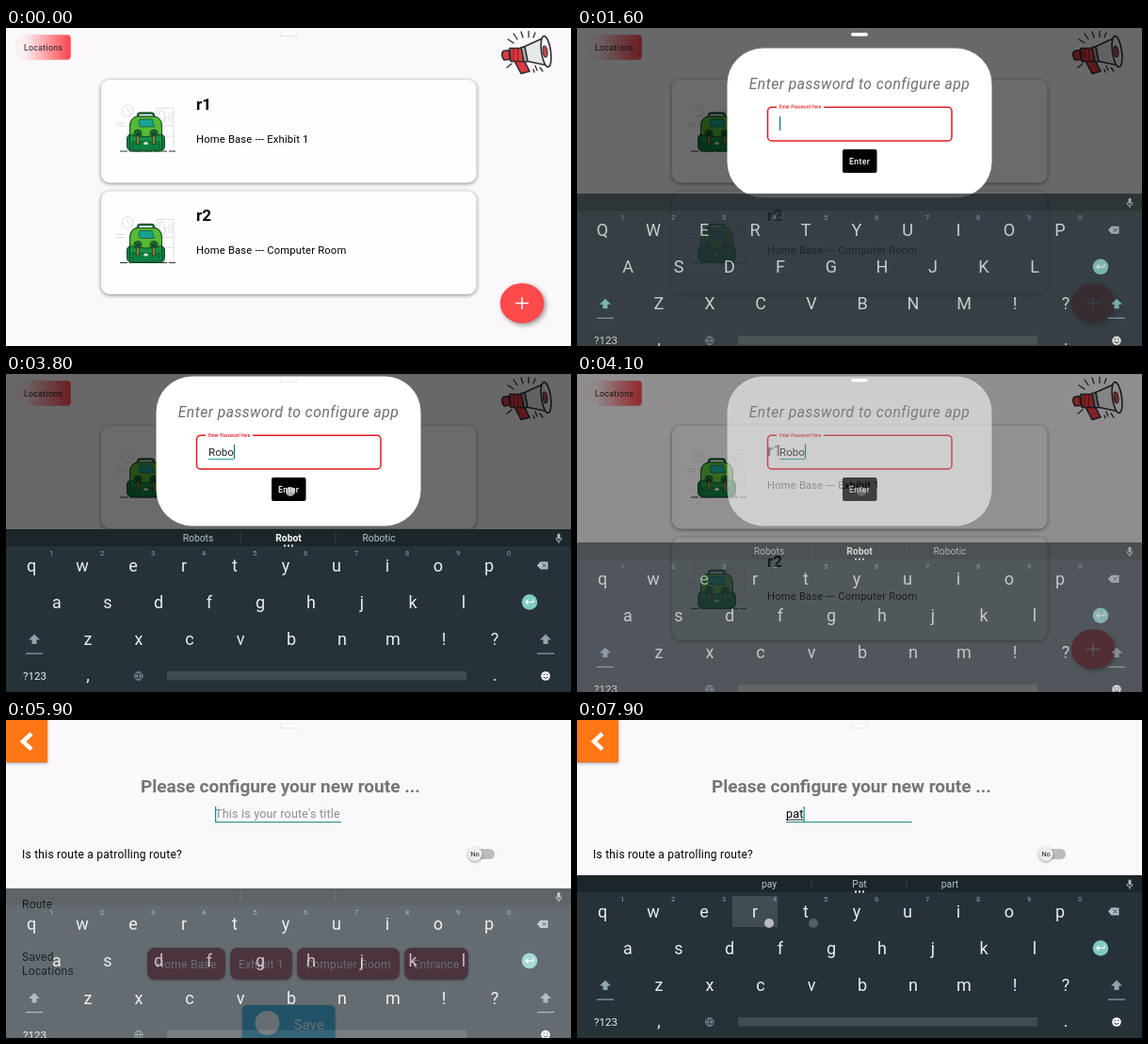
Recreate the animation shown at these times as an HTML page. Size 600x338 px, loop 8 s.

```html
<!DOCTYPE html>
<html lang="en">
<head>
<meta charset="utf-8">
<title>Route setup</title>
<style>
  html, body { margin: 0; width: 100%; height: 100%; overflow: hidden; background: #faf8fa; }
  svg { display: block; width: 100%; height: 100%; font-family: Roboto, sans-serif; }
  svg * { animation-duration: 8s; animation-iteration-count: infinite; animation-timing-function: linear; }
  .mid { text-anchor: middle; }
  .body { font-size: 11.2px; letter-spacing: .2px; }
  .form { font-size: 12px; letter-spacing: .25px; }
  .btn { font-size: 8.75px; letter-spacing: .31px; }
  .input { font-size: 12.5px; letter-spacing: .2px; }
  .card { fill: #fefdff; filter: drop-shadow(0 1.5px 2px #0007); }
  .soft { filter: drop-shadow(0 1px 1.5px #0006); }

  /* 1% of the loop is 80 ms */
  #dim { animation-name: dim; }
  @keyframes dim {
    0%, 13.75% { opacity: 0; }
    16.25% { opacity: .37; }
    18%, 50.5% { opacity: .58; }
    53.5%, 100% { opacity: 0; }
  }
  #dialog { animation-name: dialog; }
  @keyframes dialog {
    0%, 13.75% { opacity: 0; transform: none; }
    15.9% { opacity: 1; }
    18.1% { transform: none; animation-timing-function: ease-out; }
    21.3% { transform: translateY(-87px); }
    50.3% { opacity: 1; }
    52.5%, 100% { opacity: 0; transform: translateY(-87px); }
  }
  #label { animation-name: label; }
  @keyframes label {
    0%, 16.25% { transform: translate(215px, 171px) scale(1); animation-timing-function: ease-out; }
    18.2%, 100% { transform: translate(215px, 153.7px) scale(.46); }
  }
  #gap { transform-box: fill-box; transform-origin: 0 0; animation-name: gap; }
  @keyframes gap {
    0%, 15.9% { transform: scaleX(0); }
    16.25% { transform: scaleX(.18); }
    18.2%, 100% { transform: none; }
  }
  #keyboard { animation-name: keyboard; }
  @keyframes keyboard {
    0%, 18.1% { opacity: 0; transform: translateY(35px); }
    18.13% { opacity: .24; transform: translateY(35px); animation-timing-function: cubic-bezier(.33, .67, .67, 1); }
    22.5%, 50% { opacity: 1; transform: none; }
    53.1%, 71.86% { opacity: 0; transform: translateY(35px); }
    71.88% { opacity: .24; transform: translateY(35px); animation-timing-function: cubic-bezier(.33, .67, .67, 1); }
    76.88%, 100% { opacity: 1; transform: none; }
  }
  #route { animation-name: route; }
  @keyframes route {
    0%, 51.5% { opacity: 0; transform: translateY(40px); animation-timing-function: cubic-bezier(.36, .66, .04, 1); }
    54.9%, 100% { opacity: 1; transform: none; }
  }
  #bar { animation-name: bar; }
  @keyframes bar {
    0%, 68.75% { opacity: 1; }
    71.25%, 100% { opacity: 0; }
  }
</style>
</head>
<body>
<svg viewBox="0 0 600 338" preserveAspectRatio="none">
  <defs>
    <linearGradient id="blush">
      <stop offset="0" stop-color="#fbf8fa"/>
      <stop offset=".2" stop-color="#fbeaec"/>
      <stop offset=".95" stop-color="#ff4c54"/>
    </linearGradient>
    <g id="pack" stroke-linejoin="round">
      <g fill="none" stroke="#dcdadc" stroke-width=".9">
        <circle cx="129" cy="88" r="6"/>
        <path d="M129 84.5v3.500h3M116 101h10M118 104h8M160 128V85h18v43M160 104h18M160 115h18M163 88h5v13h-5zM170 100v-7M173 100v-9M176 100v-11M163 125v-6M166 125v-7"/>
      </g>
      <path d="M121 131h59" stroke="#333" stroke-width="1.2" stroke-dasharray="8 2 14 2"/>
      <path d="M140 96v-3q0-2.500 3-2.500h11q3 0 3 2.500v3" fill="none" stroke="#175c34" stroke-width="2.6"/>
      <rect x="128.5" y="113" width="40" height="17.5" rx="4.5" fill="#0f7d3c" stroke="#14482a"/>
      <path d="M131.500 127v-21q0-12 9-12h16q9 0 9 12v21q0 4-4 4h-26q-4 0-4-4z" fill="#159045" stroke="#14482a"/>
      <path d="M131.500 113v-7q0-12 9-12h16q9 0 9 12v7q-17 5-34 0z" fill="#57b834" stroke="#14482a"/>
      <path d="M142 97h13l2.500 8h-15q-3-4-.5-8z" fill="#18a38f" stroke="#14584a" stroke-width=".8"/>
      <path d="M134 121h29v7q0 2-3 2h-23q-3 0-3-2z" fill="#0d8040" stroke="#14482a" stroke-width=".7"/>
      <g fill="#1f6b34" stroke="#143d24" stroke-width=".8">
        <circle cx="140" cy="112" r="4"/><circle cx="157" cy="112" r="4"/>
      </g>
      <path d="M140 111v13M157 111v13" stroke="#14482a" stroke-width="3.4"/>
      <path d="M140 115v8M157 115v8" stroke="#d9822b" stroke-width="1.5"/>
      <ellipse cx="148.5" cy="122.5" rx="2.5" ry="1.5" fill="#d5ead2"/>
    </g>
    <g id="shift"><path d="M30 276.500l6 6h-3.500v4.500h-5v-4.500H24z"/><path d="M21 296.500h18v1.200H21z" fill="#90a4ae"/></g>
  </defs>

  <rect width="600" height="338" fill="#faf8fa"/>
  <path d="M23 7h42q4 0 4 4v19q0 4-4 4H23a13 13.500 0 0 1 0-27z" fill="url(#blush)" stroke="#e6dfe0" stroke-width=".6"/>
  <text class="btn" x="19" y="24" fill="#222">Locations</text>

  <g stroke="#2b2f33" stroke-width="1.6" stroke-linejoin="round" stroke-linecap="round">
    <path d="M533 12l6 4M539 6l4 6M547 4l2 6M555 3.500v6M562 5l-2 5M532 42l5-4M562 40l2 5M567 42l3 4M560 44l1 3" stroke-width="1.3"/>
    <path d="M540 35l10-1 6 12-9 2.500z" fill="#e2393f"/>
    <path d="M535 21.500h13l2 14h-14z" fill="#e2393f"/>
    <path d="M528 24.500l6-1 1 10-6 .5q-4-5-1-9.500z" fill="#e2393f"/>
    <path d="M550 20l22-10 4 30-24-5z" fill="#e6e7e8"/>
    <path d="M547 20.500l4-.5 3 15.500-4 .5z" fill="#a9adb0"/>
    <ellipse cx="573.5" cy="25" rx="5" ry="16.5" transform="rotate(-8 573.5 25)" fill="#f6f6f6"/>
    <ellipse cx="572.5" cy="25" rx="2.4" ry="6" transform="rotate(-8 572.5 25)" fill="#c2454a" stroke-width="1"/>
    <path d="M539 22v13M543.500 22v13" stroke="#8e2026" stroke-width="1.2"/>
  </g>

  <rect class="card" x="101" y="55" width="398.5" height="109.5" rx="9"/>
  <rect class="card" x="101" y="173.5" width="398.5" height="109.5" rx="9"/>
  <use href="#pack"/>
  <use href="#pack" y="118.5"/>
  <g font-size="17" font-weight="700"><text x="202" y="87">r1</text><text x="202" y="205">r2</text></g>
  <g class="body"><text x="202" y="121.5">Home Base --- Exhibit 1</text><text x="202" y="240">Home Base --- Computer Room</text></g>
  <ellipse cx="548" cy="292.5" rx="23.3" ry="21.3" fill="#ff4a4c" style="filter:drop-shadow(2px 2px 2.5px #0006)"/>
  <path d="M541 292.500h14M548 286v13" stroke="#fff" stroke-width="1.5"/>
  <rect id="dim" width="600" height="338" fill="#030103"/>

  <g id="route">
    <rect width="600" height="390" fill="#faf8fa"/>
    <rect class="soft" width="44" height="45" fill="#ff7615"/>
    <path d="M27 14.500l-9 8.300 9 8.300" fill="none" stroke="#fff" stroke-width="4.5"/>
    <text x="143" y="77" font-size="19" font-weight="700" fill="#757575">Please configure your new route ...</text>
    <text id="hint" class="input" x="222" y="104" fill="#8d8b8d">This is your route's title</text>
    <rect id="line" x="222" y="108" width="134" height="1"/>
    <text id="title" class="input" x="222" y="104"></text>
    <rect id="titleMark" x="222" y="105.5" height="1" fill="#222"/>
    <rect id="titleCaret" y="92" width="1.2" height="16" fill="#009688"/>
    <g class="form">
      <text x="17" y="147">Is this route a patrolling route?</text>
      <text x="17" y="200">Route</text>
      <text x="17" y="256">Saved</text>
      <text x="17" y="271">Locations</text>
    </g>
    <rect x="492" y="137" width="27" height="11" rx="5.5" fill="#bdbbbd"/>
    <circle class="soft" cx="498" cy="142.5" r="7.5" fill="#efedef"/>
    <text class="mid" x="498" y="145.2" font-size="7.5" fill="#222">No</text>
    <g id="chips" class="form" fill="#fff"></g>
    <rect class="soft" x="251" y="303" width="98.5" height="44" rx="5" fill="#1ea0da"/>
    <circle cx="277.5" cy="322" r="13" fill="#fff"/>
    <text x="306" y="328.5" font-size="14.4" letter-spacing=".3" fill="#fff">Save</text>
    <rect id="bar" x="598" width="2" height="322" fill="#949294"/>
  </g>

  <g id="dialog">
    <rect x="159.5" y="89.5" width="281" height="159" rx="38" fill="#fff"/>
    <text class="mid" x="300" y="133" font-size="15.6" letter-spacing=".52" font-style="italic" fill="#6d6d6d">Enter password to configure app</text>
    <rect x="202.5" y="152.3" width="195.5" height="35.7" rx="4" fill="none" stroke="#e3191f" stroke-width="1.5"/>
    <rect id="gap" x="212" y="151" width="50" height="3" fill="#fff"/>
    <text id="label" font-size="10" letter-spacing=".12" font-weight="500" fill="#e3191f">Enter Password Here</text>
    <text id="word" x="215" y="174" font-size="11.6" fill="#222"></text>
    <rect id="wordMark" x="215" y="177" height="1" fill="#2b9fae"/>
    <rect id="wordCaret" y="162" width="1.2" height="15" fill="#00796b"/>
    <rect x="282" y="197" width="36.5" height="25" rx="2"/>
    <text class="btn mid" x="300" y="212.5" font-weight="500" fill="#fff">Enter</text>
  </g>

  <g id="keyboard">
    <rect y="165" width="600" height="210" fill="#263238"/>
    <rect y="165" width="600" height="18" fill="#1b252a"/>
    <rect id="press" width="48" height="33" fill="#414c52"/>
    <path id="rules" d="M249 169v11M350 169v11" stroke="#38444a"/>
    <g id="picks" class="mid" font-size="10.3"></g>
    <path id="more" d="M295 182.500h10" stroke="#eceff1" stroke-width="2" stroke-dasharray="2"/>
    <g id="keys" class="mid" font-size="18" fill="#e9edef"></g>
    <g id="hints" class="mid" font-size="7.5" fill="#90a4ae"></g>
    <g fill="#b0bec5">
      <rect x="585.5" y="169.5" width="3" height="6" rx="1.5"/>
      <path d="M584 174q0 3.500 3 3.500t3-3.500M587 177.500v2.500" fill="none" stroke="#b0bec5"/>
      <path d="M564 203.500l3.500-4h8v8h-8z"/>
      <path d="M569.500 201.500l4 4m0-4l-4 4" stroke="#263238"/>
    </g>
    <g id="shifts"><use href="#shift"/><use href="#shift" x="543"/></g>
    <circle cx="556" cy="242.5" r="8.3" fill="#80cbc4"/>
    <path d="M560 239.500v3h-8m2.500-2.500l-2.500 2.500 2.500 2.500" fill="none" stroke="#fff" stroke-width="1.2"/>
    <g fill="#e9edef" class="mid" font-size="18">
      <text x="30.5" y="325" font-size="11.6">?123</text><text x="87" y="326">,</text><text x="519" y="326">.</text>
    </g>
    <path d="M136.500 321a4.300 4.300 0 1 0 8.600 0a4.300 4.300 0 1 0-8.600 0h8.600M140.800 316.700q-4 4.300 0 8.600q4-4.300 0-8.600" fill="none" stroke="#90a4ae" stroke-width=".8"/>
    <rect x="171" y="316" width="318" height="9.5" rx="1" fill="#414c52"/>
    <circle cx="573" cy="321" r="4.8" fill="#fff"/>
    <path d="M570.700 319.500h1.300M574 319.500h1.300M570.500 322q2.500 3 5 0" fill="none" stroke="#263238"/>
  </g>

  <rect x="291" y="5" width="18" height="3.7" rx="1.8" fill="#fff" style="filter:drop-shadow(0 .6px .6px #0007)"/>
  <g id="touches" fill="#e2e2e2"></g>
</svg>

<script>
const LOOP = 8000;
const $ = id => document.getElementById(id);
const show = (el, on) => el.setAttribute('visibility', on ? 'inherit' : 'hidden');

function add(parent, tag, attrs, text = '') {
  const el = document.createElementNS('http://www.w3.org/2000/svg', tag);
  for (const name in attrs) el.setAttribute(name, attrs[name]);
  el.textContent = text;
  return parent.appendChild(el);
}

// Location chips
[['Home Base', 150, 83], ['Exhibit 1', 238, 66], ['Computer Room', 309, 109], ['Entrance', 423, 68]]
  .forEach(([name, x, w]) => {
    add($('chips'), 'rect', { x, y: 242, width: w, height: 34, rx: 8, fill: '#a83a50', class: 'soft' });
    add($('chips'), 'text', { x: x + w / 2, y: 263.5, class: 'mid' }, name);
  });

// Letter keys
const keys = {};
[['qwertyuiop', 27, 203.5], ['asdfghjkl', 54, 242.5], ['zxcvbnm!?', 87, 282]].forEach(([row, x0, y]) =>
  [...row].forEach((char, i) => {
    const x = x0 + i * 54;
    keys[char] = { x, y, el: add($('keys'), 'text', { x, y: y + 6 }) };
  }));
[...'1234567890'].forEach((n, i) => add($('hints'), 'text', { x: 48 + i * 54, y: 193 }, n));
const picks = [204, 300, 396].map(x => add($('picks'), 'text', { x, y: 178 }));

// Key taps: time, key, finger offset
const taps = [
  [2600, 'r', 8, 8], [3000, 'o', 6, 8], [3200, 'b', 4, -5], [3500, 'o', 6, 8],
  [7000, 'p', 6, 10], [7300, 'a', 6, 10], [7700, 't', 8, 12.5], [7900, 'r', 15, 12.5]
];
// Touches: time, hold, x, y
const touches = [
  [1000, 150, 548, 293], [3800, 200, 302, 125], [5500, 150, 290, 102],
  ...taps.map(([at, k, dx, dy]) => [at, 100, keys[k].x + dx, keys[k].y + dy])
].map(([at, hold, cx, cy]) => ({ at, hold, el: add($('touches'), 'circle', { cx, cy, r: 5 }) }));

// Typed text and suggestions
const steps = [
  [0, '', ['', '', '']],
  [2000, '', ['', 'Greetings', '']],
  [2700, 'R', ['Re', 'R', 'Right']],
  [3100, 'Ro', ['Road', 'Ro', 'Room']],
  [3300, 'Rob', ['Robes', 'Rob', 'Robot']],
  [3600, 'Robo', ['Robots', 'Robot', 'Robotic']],
  [4400, '', ['', '', '']],
  [7100, 'p', ['o', 'p', 'put']],
  [7400, 'pa', ['pa', 'pay', 'part']],
  [7800, 'pat', ['pa', 'pay', 'part']],
  [7900, 'pat', ['pay', 'Pat', 'part']]
];

function setField(name, text, x, caretOn) {
  const el = $(name);
  if (el.textContent !== text) el.textContent = text;
  const width = text ? el.getComputedTextLength() : 0;
  $(name + 'Mark').setAttribute('width', width);
  $(name + 'Caret').setAttribute('x', x + width);
  show($(name + 'Caret'), caretOn);
}

const within = (t, a, b) => t >= a && t < b;
let lastStep, lastCaps;

function draw(t) {
  const step = steps.findLast(s => t >= s[0]);
  const [, text, words] = step;
  const first = t < 4400;
  const caps = t < 2700;

  setField('word', first ? text : 'Robo', 215, within(t, 1300, 1800) || within(t, 2300, 4400));
  setField('title', first ? '' : text, 222, within(t, 5700, 6200) || t >= 6700);
  show($('hint'), first || !text);
  $('line').setAttribute('fill', t < 5700 ? '#9a989a' : '#26897f');

  if (step !== lastStep) {
    words.forEach((word, i) => picks[i].textContent = word);
    const sure = text === 'Robo';
    picks.forEach((el, i) => {
      el.setAttribute('fill', sure && i === 1 ? '#fff' : '#b9c4c9');
      el.setAttribute('font-weight', sure && i === 1 ? 700 : 400);
    });
    show($('more'), text);
    show($('rules'), !caps);
    lastStep = step;
  }
  if (caps !== lastCaps) {
    for (const k in keys) keys[k].el.textContent = caps ? k.toUpperCase() : k;
    $('shifts').setAttribute('fill', caps ? '#80cbc4' : '#90a4ae');
    lastCaps = caps;
  }

  const tap = taps.find(([at]) => within(t, at, at + 100));
  show($('press'), tap);
  if (tap) {
    $('press').setAttribute('x', keys[tap[1]].x - 24);
    $('press').setAttribute('y', keys[tap[1]].y - 16.5);
  }
  for (const { at, hold, el } of touches) {
    const fade = 1 - Math.max(0, t - at - hold) / 150;
    el.setAttribute('opacity', t < at ? 0 : .75 * Math.max(0, fade));
  }
}

let start;
function tick(now) {
  start ??= now;
  draw((now - start) % LOOP);
  requestAnimationFrame(tick);
}
draw(0);
requestAnimationFrame(tick);
</script>
</body>
</html>
```
